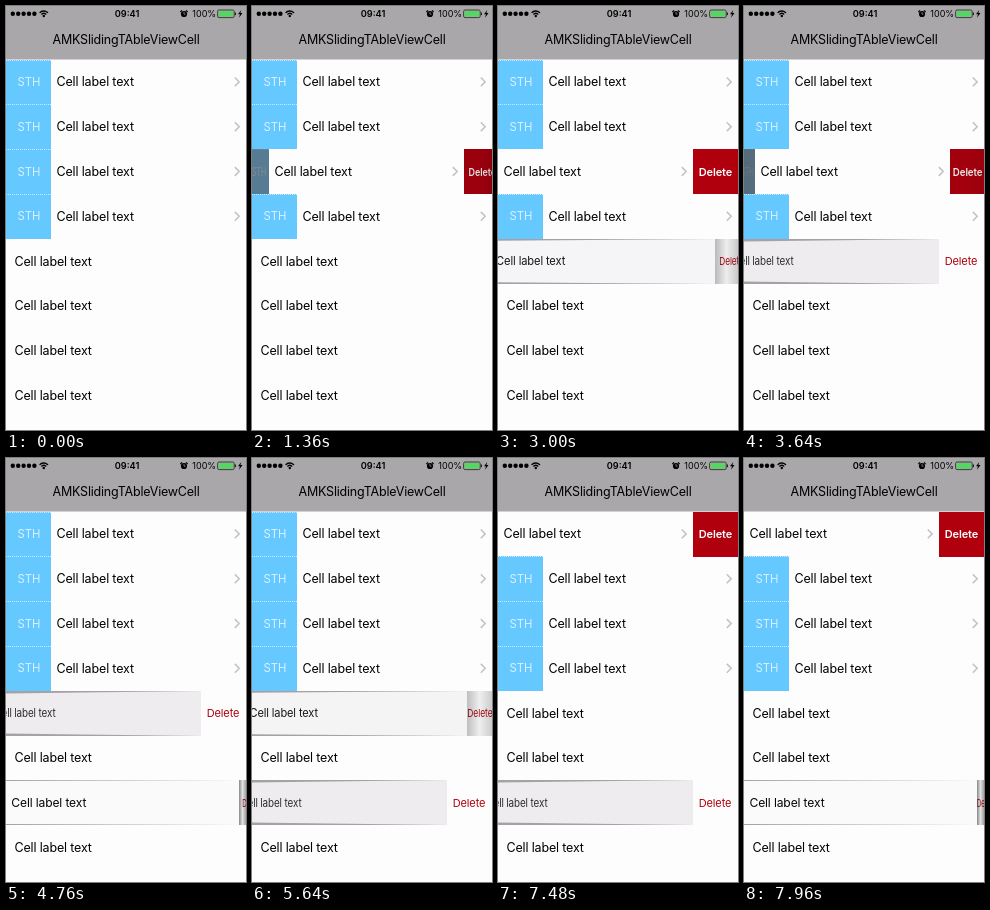
An HTML page with a canvas that plays this animation: 240x424 px, repeating every 8 s.

```html
<!DOCTYPE html>
<html lang="en">
<head>
<meta charset="utf-8">
<title>Sliding cells</title>
<style>
  html, body { margin: 0; width: 100%; height: 100%; overflow: hidden; background: #fdfdfd; }
  canvas { display: block; width: 240px; height: 424px; }
</style>
</head>
<body>
<canvas id="stage"></canvas>
<script>
const W = 240, H = 424, LOOP = 8000, SLIDE = 360;
const TOP = 53.5, PITCH = 44.8, CELL = 45, SIDE = 45;
const FONT = 'Inter, Roboto, sans-serif';
const BLUE = '#65c8ff', RED = '#b0000e';

// When each cell opens and closes, by row.
const slides = {
  0: { open: 7117, close: Infinity },
  2: { open: 1153, close: 3520 },
  4: { open: 2818, close: 5471 },
  6: { open: 4663, close: 7697 }
};

const canvas = document.getElementById('stage');
const ctx = canvas.getContext('2d');
const dpr = window.devicePixelRatio || 1;
canvas.width = W * dpr;
canvas.height = H * dpr;

const clamp = v => Math.max(0, Math.min(1, v));

// Cubic ease-in-out with control points (.42, 0) and (.58, 1).
function ease(x) {
  x = clamp(x);
  let lo = 0, hi = 1;
  for (let i = 0; i < 18; i++) {
    const u = (lo + hi) / 2, v = 1 - u;
    if (3 * v * v * u * 0.42 + 3 * v * u * u * 0.58 + u ** 3 < x) lo = u;
    else hi = u;
  }
  return lo * lo * (3 - 2 * lo);
}

function rect(x, y, w, h, fill) {
  ctx.fillStyle = fill;
  ctx.fillRect(x, y, w, h);
}

function text(str, x, y, size, fill, { weight = 400, gap = 0, align = 'left', sx = 1, sy = 1 } = {}) {
  ctx.save();
  ctx.translate(x, y);
  ctx.scale(sx, sy);
  ctx.font = `${weight} ${size}px ${FONT}`;
  ctx.letterSpacing = gap + 'px';
  ctx.textAlign = align;
  ctx.fillStyle = fill;
  ctx.fillText(str, 0, size * 0.364);
  ctx.restore();
}

function path(points, close) {
  ctx.beginPath();
  points.forEach(([x, y]) => ctx.lineTo(x, y));
  if (close) ctx.closePath();
}

function disc(x, y, r) {
  ctx.beginPath();
  ctx.arc(x, y, r, 0, 7);
  ctx.fill();
}

function clipTo(x, y, w, h, draw) {
  ctx.save();
  ctx.beginPath();
  ctx.rect(x, y, w, h);
  ctx.clip();
  draw();
  ctx.restore();
}

// Horizontal shading with evenly spaced opacities.
function shade(x0, x1, rgb, alphas) {
  const g = ctx.createLinearGradient(x0, 0, x1, 0);
  alphas.forEach((a, i) => g.addColorStop(i / (alphas.length - 1), `rgba(${rgb},${a})`));
  return g;
}

function chevron(x, y) {
  ctx.strokeStyle = '#c2c2c6';
  ctx.lineWidth = 1.5;
  path([[x - 2.2, y - 4.4], [x + 2.2, y], [x - 2.2, y + 4.4]]);
  ctx.stroke();
}

const label = (x, y, fill, opts) =>
  text('Cell label text', x, y, 12.5, fill, { gap: -0.15, ...opts });

function deleteFlap(top, mid, p, closing, bold) {
  const w = Math.round(SIDE * p), x = W - w, dark = 1 - p;
  const inset = closing ? Math.max(0, 6 * (2 * p - 1)) : 3 + 3 * p;
  clipTo(x, top, w, CELL, () => {
    rect(x, top, w, CELL, bold ? RED : '#fdfdfd');
    text('Delete', x + inset - 0.3, mid, 11, bold ? '#fff' : RED,
      { weight: bold ? 600 : 400, gap: -0.12, sx: 0.5 + 0.5 * p });
    const fill = bold
      ? shade(x, W, '0,0,0', [0.35 * dark, 0.3 * dark, 0.55 * dark])
      : shade(x, W, '40,38,40', [0.65 * dark, 0.15 * dark, 0.5 * dark]);
    rect(x, top, w, CELL, fill);
  });
}

function slidingCell(top, mid, p, closing) {
  const dx = Math.round(SIDE * p), w = SIDE - dx;
  if (w > 0) {
    clipTo(0, top, w, CELL, () => {
      rect(0, top, w, CELL, BLUE);
      text('STH', w / 2 + 0.4 - 3 * p, mid, 11.3, '#d9f1ff',
        { align: 'center', sx: 1 - 0.6 * p });
      for (let x = 0; x < w; x += 2) rect(x, top, 1, 1, 'rgba(255,255,255,.65)');
      rect(0, top, w, CELL, `rgba(80,80,85,${p})`);
    });
  }
  label(50.5 - dx, mid, '#000');
  chevron(231 - dx, mid);
  if (p > 0) deleteFlap(top, mid, p, closing, true);
}

function foldingCell(top, mid, p, closing) {
  if (p > 0) {
    // The far left edge of the panel shrinks and shows the grey behind it.
    const edge = W - Math.round(SIDE * p), bottom = top + CELL;
    const inset = Math.min(1, p * 8) * (0.7 + 1.9 * p);
    rect(0, top, edge, CELL, '#a5a2a5');
    const tone = c => Math.round(253 - (253 - c) * p);
    ctx.fillStyle = `rgb(${tone(238)},${tone(236)},${tone(239)})`;
    path([[0, top + inset], [edge, top], [edge, bottom], [0, bottom - inset]], true);
    ctx.fill();
  }
  const ink = Math.round(45 * p);
  label(8.4 - 20 * p, mid, `rgb(${ink},${ink},${ink})`, { sx: 1 - 0.21 * p, sy: 1 - 0.1 * p });
  if (p > 0) deleteFlap(top, mid, p, closing, false);
}

function statusBar() {
  ctx.fillStyle = '#000';
  for (let i = 0; i < 5; i++) disc(6.8 + 5.4 * i, 7.8, 2.2);

  ctx.strokeStyle = '#000';
  ctx.lineWidth = 1.3;
  for (const r of [3.2, 5.6]) {
    ctx.beginPath();
    ctx.arc(37.8, 10.6, r, -Math.PI * 0.77, -Math.PI * 0.23);
    ctx.stroke();
  }
  disc(37.8, 10, 1.2);

  text('09:41', 121, 7.7, 9.2, '#000', { weight: 600, align: 'center' });

  disc(178, 8, 3.1);
  ctx.lineWidth = 1.2;
  path([[174.4, 6], [176, 4.4]]);
  ctx.stroke();
  path([[181.6, 6], [180, 4.4]]);
  ctx.stroke();
  ctx.strokeStyle = '#a9a7a9';
  ctx.lineWidth = 0.7;
  path([[178, 6], [178, 8.2], [179.5, 8.2]]);
  ctx.stroke();

  text('100%', 186.3, 7.7, 9, '#000');

  ctx.strokeStyle = '#222';
  ctx.lineWidth = 0.8;
  ctx.beginPath();
  ctx.roundRect(211.6, 4, 16.6, 7.6, 1.5);
  ctx.stroke();
  rect(212.7, 5.1, 14.4, 5.4, '#55d562');
  rect(228.8, 6.5, 1.2, 2.6, '#222');
  ctx.fillStyle = '#000';
  path([[235.3, 4], [232, 8.3], [234, 8.3], [233, 11.7], [236.5, 7.1], [234.4, 7.1]], true);
  ctx.fill();
}

function draw(t) {
  ctx.setTransform(dpr, 0, 0, dpr, 0, 0);
  ctx.textBaseline = 'alphabetic';
  rect(0, 0, W, H, '#fdfdfd');
  for (let i = 0; i < 8; i++) {
    const s = slides[i], y = TOP + PITCH * i;
    const closing = !!s && t >= s.close;
    const p = s ? ease((t - s.open) / SLIDE) - ease((t - s.close) / SLIDE) : 0;
    const open = p > 0.999 ? 1 : p < 0.001 ? 0 : p;
    const cell = i < 4 ? slidingCell : foldingCell;
    cell(Math.round(y), y + PITCH / 2, open, closing);
  }
  rect(0, 0, W, TOP, '#a9a7a9');
  text('AMKSlidingTAbleViewCell', W / 2, 33.5, 12.5, '#000', { gap: -0.21, align: 'center' });
  statusBar();
}

const start = performance.now();
function tick() {
  draw((performance.now() - start) % LOOP);
  requestAnimationFrame(tick);
}
tick();
</script>
</body>
</html>
```
